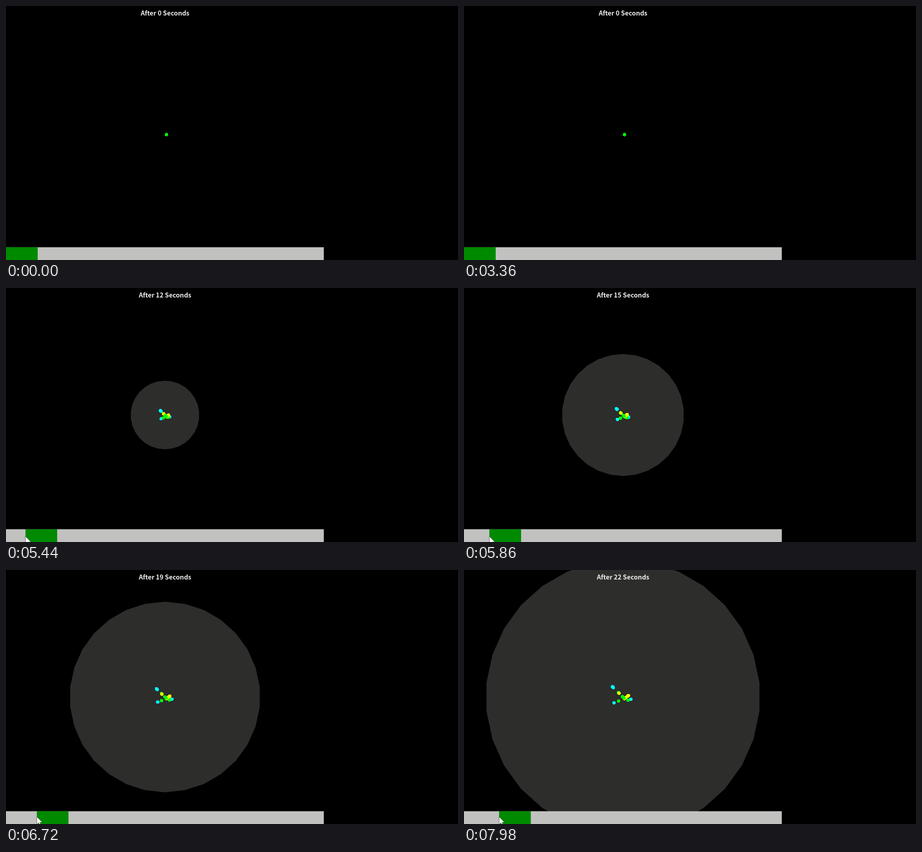
Recreate the animation shown at these times as an HTML page. Size 998 by 561 pixels, loop 8000 ms.

```html
<!DOCTYPE html>
<html lang="en">
<head>
<meta charset="utf-8">
<title>Expansion over time</title>
<style>
  html, body { margin: 0; width: 100%; height: 100%; overflow: hidden; background: #000; }
  svg { display: block; width: 998px; height: 561px; }
  text { font: 600 14.2px "Noto Sans CJK JP", "Noto Sans CJK SC", "Noto Sans CJK", "Open Sans", sans-serif; fill: #ececec; text-anchor: middle; }
  #dots { shape-rendering: crispEdges; }
</style>
</head>
<body>
<svg viewBox="0 0 998 561">
  <polygon id="wave" fill="#2d2d2c"/>
  <g id="dots"></g>
  <rect y="532.8" width="701.7" height="29" fill="#c1c1bf"/>
  <rect id="thumb" y="532.8" width="70" height="29" fill="#008a00"/>
  <path id="cursor" d="M0 0V17L4 13.4L6.8 19.5L9.3 18.4L6.7 12.4H12.2Z" fill="#fff" stroke="#111" stroke-width=".6"/>
  <text id="label" x="351.2" y="21.3"></text>
</svg>
<script>
const LOOP = 8000;
const PX_PER_SECOND = 3.511;
const SIDES = 30;
const LAG = 40;  // the simulation trails the slider slightly
const GRAB = 4340, GRAB_X = 34.5;
const GREEN = "#0f0", YELLOW = "#ff0", CYAN = "#0ff";

// key points of the drag: [time, value]
const slider = [
  [GRAB, 0], [4440, GRAB_X], [5200, GRAB_X], [5440, 43], [5860, 56],
  [6720, 68], [7560, 74.5], [7720, 74.5], [7900, 77.5]
];
const cursorY = [[3340, 561], [3920, 548.5], [5860, 548.5], [6720, 545]];

// each arm flies one way; its particles differ in colour and share of the speed
const arms = [
  { vx: -.97, vy: .39, parts: [[CYAN, 1], [GREEN, .56]] },
  { vx: .59, vy: .06, parts: [[CYAN, 1]] },
  { vx: .32, vy: .15, parts: [[GREEN, 1]] },
  { vx: .36, vy: -.28, parts: [[YELLOW, 0], [YELLOW, .36], [YELLOW, .8], [YELLOW, 1]] },
  { vx: -1.1, vy: -1.08, parts: [[CYAN, 1.01], [CYAN, .93], [GREEN, .51], [YELLOW, .46], [GREEN, .17], [GREEN, .05]] }
];

const el = id => document.getElementById(id);
const wave = el("wave"), thumb = el("thumb"), cursor = el("cursor"), label = el("label");

function addDot(color, vx, vy) {
  const node = document.createElementNS("http://www.w3.org/2000/svg", "circle");
  node.setAttribute("r", 3.7);
  node.setAttribute("fill", color);
  el("dots").append(node);
  return { node, vx, vy };
}
const dots = arms.flatMap(({ vx, vy, parts }) =>
  parts.map(([color, share]) => addDot(color, vx * share, vy * share)));

function valueAt(keys, t) {
  const next = keys.findIndex(([time]) => time > t);
  if (next === 0) return keys[0][1];
  if (next < 0) return keys[keys.length - 1][1];
  const [t0, a] = keys[next - 1], [t1, b] = keys[next];
  return a + (b - a) * (t - t0) / (t1 - t0);
}

function ring(radius) {
  return Array.from({ length: SIDES }, (_, i) => {
    const a = i * 2 * Math.PI / SIDES;
    return [351 + radius * Math.sin(a), 280.5 - radius * Math.cos(a)];
  }).join(" ");
}

function draw(t) {
  const x = valueAt(slider, t);
  // the simulation advances two seconds at a time
  const age = 2 * Math.ceil(valueAt(slider, t - LAG) / PX_PER_SECOND / 2);

  wave.setAttribute("points", ring(.526 * age * age));
  for (const { node, vx, vy } of dots) {
    node.setAttribute("cx", 354.4 + vx * age);
    node.setAttribute("cy", 284 + vy * age);
  }

  thumb.setAttribute("x", x);
  cursor.setAttribute("transform", `translate(${Math.max(x, GRAB_X)} ${valueAt(cursorY, t)})`);
  label.textContent = `After ${Math.floor(x / PX_PER_SECOND)} Seconds`;
}

const start = performance.now();
function tick() {
  const t = (performance.now() - start) % LOOP;
  draw(Math.floor(t / 20) * 20);
  requestAnimationFrame(tick);
}
tick();
</script>
</body>
</html>
```
